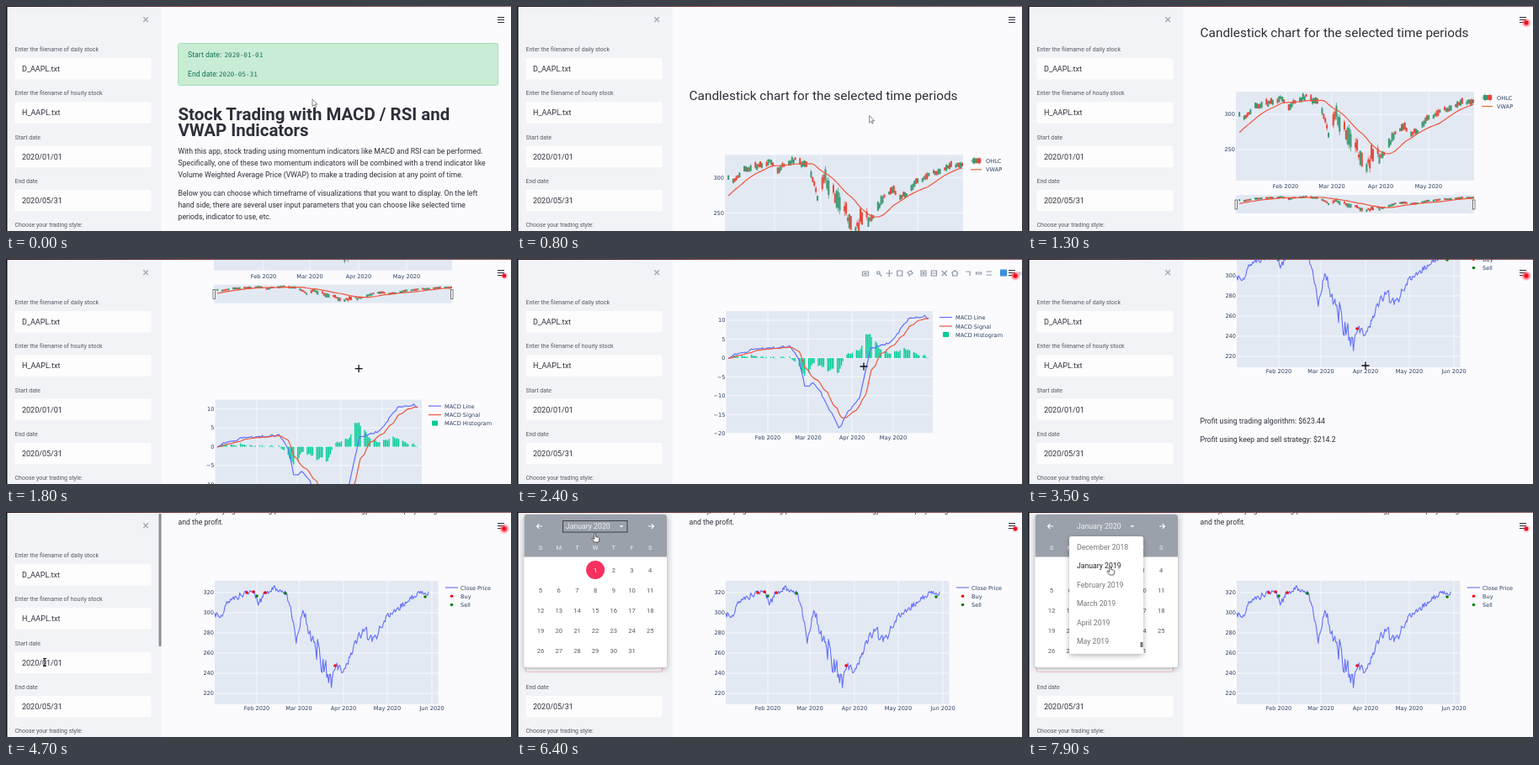
These frames come from a looping animation (600 by 268 pixels, 8000 ms). An HTML page:

```html
<!DOCTYPE html>
<html lang="en">
<head>
<meta charset="utf-8">
<title>Stock trading dashboard</title>
<style>
html, body { margin: 0; height: 100%; overflow: hidden; background: #fbfbfe; }
svg { display: block; width: 100vw; height: 100vh; }
text { font-family: Roboto, sans-serif; white-space: pre; }
.plot { font-family: "DejaVu Sans", sans-serif; }
.mono { font-family: "DejaVu Sans Mono", monospace; }
</style>
</head>
<body>
<svg id="stage" viewBox="0 0 600 268"></svg>
<script>
const INK = '#2d2f39', TICK = '#2a3f5f', PLOT = '#e2e9f3';
const BLUE = '#636efa', RED = '#ef553b', GREEN = '#00cc96';

// ---------- drawing helpers ----------
const text = (x, y, s, size = 8.7, fill = INK, more = '') =>
  `<text x="${x}" y="${y}" font-size="${size}" fill="${fill}" ${more}>${s}</text>`;
const label = (x, y, s, anchor = 'start') =>
  text(x, y, s, 6.6, TICK, `class="plot" text-anchor="${anchor}"`);
const rect = (x, y, w, h, fill, more = '') =>
  `<rect x="${x}" y="${y}" width="${w}" height="${h}" fill="${fill}" ${more}/>`;
const dot = (x, y, r, fill) => `<circle cx="${x}" cy="${y}" r="${r}" fill="${fill}"/>`;
const path = (d, stroke, width = 1, more = '') =>
  `<path d="${d}" fill="none" stroke="${stroke}" stroke-width="${width}" ${more}/>`;
const line = (pts, stroke, width = 1.2) =>
  path('M' + pts.map(p => p.map(v => v.toFixed(1)).join(' ')).join('L'), stroke, width, 'stroke-linejoin="round"');
const group = (id, body) => `<g id="${id}">${body}</g>`;
const span = (a, b, step = 1) => Array.from({ length: Math.floor((b - a) / step) + 1 }, (_, i) => a + i * step);
const points = s => s.split(' ').map(p => p.split(',').map(Number));

let seed = 11;
const rnd = () => (seed = (seed * 16807) % 2147483647) / 2147483647;
const bump = (x, center, width) => Math.exp(-(((x - center) / width) ** 2));
const smooth = k => k * k * (3 - 2 * k);

// Value of column c at x, between rows sorted by their first column.
function lerp(rows, x, ease = k => k, c = 1) {
  const i = rows.findIndex(r => r[0] >= x);
  if (i < 0) return rows[rows.length - 1][c];
  if (i === 0) return rows[0][c];
  const a = rows[i - 1], b = rows[i];
  return a[c] + (b[c] - a[c]) * ease((x - a[0]) / (b[0] - a[0]));
}

// ---------- market data ----------
const closeKeys = points('205,195 248,122 256,124 264,106 286,96 294,93 300,110 307,97 320,90 333,97 338,112 345,155 352,118 364,150 387,206 391,184 402,190 413,160 426,137 432,154 440,148 452,126 474,109 488,98 503,97');
const macdKeys = points('249,118 262,113 280,108 325,104 335,118 342,152 352,148 362,161 383,202 393,182 407,166 420,107 445,99 466,70 485,68 494,75');

const weekdays = span(2, 149).filter(d => (d + 3) % 7 % 6);
const priceAt = day => 320 - (lerp(closeKeys, 298 + (day - 31) * 1.72) - 96) / 1.2;
const average = list => list.reduce((a, b) => a + b) / list.length;
const vwapAt = day => average(span(day - 20, day).map(priceAt));

// Chart background, horizontal lines [value, y] and one vertical line per month.
function frame(x, y, w, h, rows, monthXs, labelY) {
  return rect(x, y, w, h, PLOT) +
    rows.map(([v, ry]) => path(`M${x} ${ry}h${w}`, '#fff', .7) + label(x - 1, ry + 2.4, v, 'end')).join('') +
    monthXs.map((cx, i) => path(`M${cx} ${y}v${h}`, '#fff', .7) +
      label(cx, labelY, ['Feb', 'Mar', 'Apr', 'May', 'Jun'][i] + ' 2020', 'middle')).join('');
}
const legend = (y, mark, name, x) => mark + label(x, y + 2.5, name);

// ---------- page sections ----------
function intro() {
  const lines = [
    'With this app, stock trading using momentum indicators like MACD and RSI can be performed.',
    'Specifically, one of these two momentum indicators will be combined with a trend indicator like',
    'Volume Weighted Average Price (VWAP) to make a trading decision at any point of time.',
    'Below you can choose which timeframe of visualizations that you want to display. On the left',
    'hand side, there are several user input parameters that you can choose like selected time',
    'periods, indicator to use, etc.'];
  const green = '#14735a', mono = 'class="mono"', bold = 'font-weight="700"';
  return rect(204.5, 44.5, 380, 50, '#c9ecd5', 'stroke="#a3e0ba" rx="2"') +
    text(216, 61, 'Start date:', 8.7, green) + text(259.5, 61, '2020-01-01', 7.6, green, mono) +
    text(216, 84, 'End date:', 8.7, green) + text(253, 84, '2020-05-31', 7.6, green, mono) +
    text(204.5, 135.7, 'Stock Trading with MACD / RSI and', 20.45, INK, bold) +
    text(204.5, 154.5, 'VWAP Indicators', 20.45, INK, bold) +
    lines.map((s, i) => text(204.5, 176.3 + i * 13.9 + (i > 2 ? 8.3 : 0), s)).join('');
}

function candles() {
  const toX = d => 306 + (d - 31) * 1.89, toY = p => 129 + (300 - p) * .84;
  const mini = y => 226 + (y - 102) * .19;
  let bars = '', small = '';
  for (const d of weekdays) {
    const x = toX(d), wild = 6 + 18 * bump(d, 75, 18);
    const mid = toY(priceAt(d)) + (rnd() - .4) * wild * .6;
    const h = 3 + rnd() * wild * .75, wick = h + rnd() * wild * .5;
    const color = rnd() < .52 ? '#3d9970' : '#e8483c';
    bars += rect(x - 1, mid - h / 2, 2, h, color) + path(`M${x} ${mid - wick / 2}v${wick}`, color, .7);
    small += rect(x - 1, mini(mid) - 1, 2, 1.3 + h * .19, color);
  }
  const trend = weekdays.map(d => [toX(d), toY(vwapAt(d))]);
  return text(204.5, 37, 'Candlestick chart for the selected time periods', 15.4) +
    frame(247, 102, 283, 106, [[300, 129], [250, 171]], [306, 361, 419, 476], 217) +
    bars + line(trend, RED) +
    rect(247, 225, 283, 22, PLOT) + small + line(trend.map(([x, y]) => [x, mini(y)]), RED) +
    [246, 528.5].map(x => rect(x, 231, 2.5, 11, '#fff', 'stroke="#444" stroke-width=".7"')).join('') +
    legend(109.5, path('M539 109h13M543 104.5v9M549 104.5v9', '#555', .6) +
      rect(541, 106, 5, 6, '#3d9970') + rect(546, 106, 5, 6, '#e8483c'), 'OHLC', 557) +
    legend(119.5, path('M539 119.5h13', '#f0652e', 1.2), 'VWAP', 557);
}

function macdChart() {
  let average = 118;
  const macd = [], signal = [];
  let bars = '';
  for (const d of weekdays) {
    const x = 298 + (d - 31) * 1.62, y = lerp(macdKeys, x) + (rnd() - .5) * 3;
    average += (y - average) * .2;
    macd.push([x, y]);
    signal.push([x, average]);
    const gap = (y - average) * .95;
    bars += rect(x - .65, 118 + Math.min(0, gap), 1.3, Math.max(.5, Math.abs(gap)), GREEN);
  }
  const rows = span(0, 6).map(i => [(i > 2 ? '−' : '') + Math.abs(10 - i * 5), 73 + i * 22.45]);
  return frame(248.5, 62, 245.5, 146, rows, [298, 346, 398, 447], 215) +
    bars + line(macd, BLUE) + line(signal, RED) +
    legend(69.5, path('M502 69.5h15', BLUE, 1.2), 'MACD Line', 521) +
    legend(80, path('M502 80h15', RED, 1.2), 'MACD Signal', 521) +
    legend(90.2, rect(506, 87, 7, 6, GREEN), 'MACD Histogram', 521);
}

function closeChart() {
  const hourly = span(248, 503, 1.1).map(x => {
    const amp = 7 + 22 * bump(x, 373, 18) + 6 * bump(x, 430, 25);
    return [x, lerp(closeKeys, x) + (rnd() - .5) * amp];
  });
  const rows = span(0, 5).map(i => [320 - i * 20, 96 + i * 24]);
  const marks = (s, color) => points(s).map(([x, y]) => dot(x, y, 1.8, color)).join('');
  return text(204.5, 1.2, 'Finally, the buying and selling points of the chosen strategy can be displayed together with the') +
    text(204.5, 15, 'and the profit.') +
    frame(248, 82, 265.5, 147, rows, [298, 348, 401, 453, 506], 235.5) +
    line(hourly, BLUE, 1.1) +
    marks('286,96 294,95 308,96 391,183', '#f00') + marks('298,100 332,97 498,101', '#008000') +
    legend(90, path('M522 90h15', BLUE, 1.1), 'Close Price', 540) +
    legend(100.3, dot(529.5, 100.3, 1.8, '#f00'), 'Buy', 540) +
    legend(110.5, dot(529.5, 110.5, 1.8, '#008000'), 'Sell', 540) +
    text(204.5, 295.5, 'Profit using trading algorithm: $623.44') +
    text(204.5, 318, 'Profit using keep and sell strategy: $214.2');
}

// ---------- fixed parts ----------
function modebar() {
  const box = 'M-3-3h6v6h-6z';
  const groups = [
    ['M-3.5-2h7v5h-7zM-1 0h2v1h-2z'],
    ['M-2-2h3v3h-3zM1 1l2.5 2.5', 'M0-4v8M-4 0h8', box, 'M-3-1l4-2 2 3-4 2zM-1 2v2'],
    [box + 'M-2 0h4M0-2v4', box + 'M-2 0h4', 'M-3-3l6 6M3-3l-6 6', 'M-4 0l4-3.5 4 3.5M-2.5 0v3h5v-3'],
    ['M-3-2h5v5', 'M-3-1h6v2h-6z', 'M-3-2h6M-3 2h6']];
  let i = 0;
  return groups.map((icons, g) => icons.map(d =>
    path(d, '#8d96a5', 1.2, `transform="translate(${414 + 12.4 * i++ + 3.5 * g} 17)"`)).join('')).join('') +
    rect(574, 12.5, 8, 8, '#3d8fe0') + path('M595.5 15l4 4M599.5 15l-4 4', '#8d96a5', .8);
}

function sidebar() {
  const fields = {
    'Enter the filename of daily stock': 'D_AAPL.txt', 'Enter the filename of hourly stock': 'H_AAPL.txt',
    'Start date': '2020/01/01', 'End date': '2020/05/31', 'Choose your trading style:': ''
  };
  return rect(0, 0, 184.5, 268, '#f1f3f6') +
    path('M163.3 13.3l5.6 5.6M168.9 13.3l-5.6 5.6', '#a3a8b4', 1.4) +
    Object.entries(fields).map(([name, value], i) => {
      const y = i * 52.3;
      return text(10.5, 54 + y, name, 7, '#555964') +
        rect(10.5, 62 + y, 162, 25.5, '#fdfdfe', 'rx="2"') + text(19, 78 + y, value, 9);
    }).join('');
}

function calendar() {
  const col = i => 28 + i * 21.7, mid = 'text-anchor="middle"';
  const days = span(1, 31).map(d => {
    const cell = d + 2, x = col(cell % 7), y = 69 + Math.floor(cell / 7) * 24;
    return (d === 1 ? dot(x, y, 11, '#f7315f') : '') + text(x, y + 2.8, d, 7.6, d === 1 ? '#fff' : '#555a63', mid);
  }).join('');
  return rect(10.5, 166.6, 162, 24, '#fdfdfe', 'rx="2" stroke="#f3b6c6"') +
    rect(8.5, 3, 169.5, 182, '#fff', 'rx="3" filter="url(#shadow)"') +
    `<path d="M8.5 53.5V6q0-3 3-3H175q3 0 3 3V53.5z" fill="#9ba1aa"/>` +
    path('M30 17h-6.5m2.8-2.8l-2.8 2.8 2.8 2.8M156 17h6.5m-2.8-2.8l2.8 2.8-2.8 2.8', '#fff', 1.1) +
    text(58, 20.2, 'January 2020', 8.7, '#f1f2f4') +
    `<path d="M121.5 16h5l-2.5 2.6z" fill="#f1f2f4"/>` +
    group('focus', rect(54.5, 10.5, 76.5, 13.5, 'none', 'stroke="#3b3f46"')) +
    [...'SMTWTFS'].map((s, i) => text(col(i), 45, s, 7.6, '#eef0f2', mid)).join('') + days;
}

const monthNames = 'January February March April May June July August September October November December'.split(' ');
const options = ['December 2018', ...monthNames.map(m => m + ' 2019'), 'January 2020'];
const menu = () => rect(49, 29, 88, 140, '#fff', 'rx="3" filter="url(#shadow)"') +
  `<g clip-path="url(#menuClip)">${group('options', options.map((s, i) => text(58, 44.7 + i * 22.5, s)).join(''))}</g>` +
  group('thumb', rect(133.5, 155, 3, 6, '#70747c'));

const cursors = {
  none: '',
  arrow: '<path d="M0 0v8.5l2-1.8 1.4 3 1.3-.6-1.4-2.9h2.7z" fill="#fff" stroke="#555" stroke-width=".7"/>',
  cross: path('M-4.5 0h9M0-4.5v9', '#111', 1.3),
  beam: path('M-2-4.5h4M0-4.5v9M-2 4.5h4', '#111', 1),
  hand: '<path d="M-1.3-4q0-1.2 1-1.2t1 1.2v2.6q3.8.2 4 1.6v2.6L3.6 5H-.8L-4 1.2q-.3-1.4.9-1l1.8 1.2z" fill="#fff" stroke="#333" stroke-width=".8"/>'
};

const stage = document.getElementById('stage');
stage.innerHTML = `<defs>
  <filter id="shadow" x="-20%" y="-20%" width="140%" height="140%"><feDropShadow dx="0" dy="2" stdDeviation="3" flood-opacity=".3"/></filter>
  <filter id="soft" x="-50%" y="-50%" width="200%" height="200%"><feGaussianBlur stdDeviation="1.2"/></filter>
  <clipPath id="menuClip"><rect x="49" y="30" width="88" height="138"/></clipPath>
  <linearGradient id="strip"><stop stop-color="#2a1418"/><stop offset=".4" stop-color="#7a3d45"/><stop offset="1" stop-color="#8a5a60"/></linearGradient>
</defs>` + rect(0, 0, 600, 268, '#fbfbfe') +
  group('page', [[0, intro()], [380, candles()], [680, macdChart()], [1000, closeChart()]]
    .map(([y, s]) => `<g transform="translate(0 ${y})">${s}</g>`).join('')) +
  group('modebar', modebar()) +
  path('M584 13.5h8M584 16.5h8M584 19.5h8', INK, 1.2) +
  group('record', `<circle id="glow" cx="592" cy="20" fill="#ff5a6a" filter="url(#soft)"/>` + dot(592, 20, 2.4, '#f0101c')) +
  sidebar() + group('scrollbar', rect(181.5, 2, 3, 158, '#8b8e95')) +
  group('calendar', calendar()) + group('menu', menu()) +
  rect(0, 0, 1.5, 268, '#15131a') + rect(0, 0, 600, 1, 'url(#strip)') +
  group('cursor', '');

// ---------- motion ----------
const el = id => document.getElementById(id);
const show = (id, on) => el(id).setAttribute('display', on ? 'inline' : 'none');
const shift = (id, x, y) => el(id).setAttribute('transform', `translate(${x.toFixed(2)} ${y.toFixed(2)})`);

// Rows of time and position.
const scroll = points('300,0 1000,380 1500,380 2000,680 2700,680 3300,1100 3900,1100 4300,1000');
const mouse = points('300,364,111 900,423,132 1600,423,132 2100,412,128 2700,412,128 3300,401,127 4000,401,127 4600,46,179 5000,46,179 6100,93,42 6700,93,20 7300,98,70');
const menuScroll = points('7000,8 7600,0');
const cursorFrom = { 0: 'arrow', 1000: 'none', 1600: 'cross', 4000: 'arrow', 4400: 'beam', 5100: 'hand' };

function draw(now) {
  const t = Math.floor(now % 8000 / 100) * 100;
  shift('page', 0, -lerp(scroll, t, smooth));

  const y = lerp(mouse, t, smooth, 2);
  shift('cursor', lerp(mouse, t, smooth), y);
  const since = Object.keys(cursorFrom).filter(k => k <= t).pop();
  el('cursor').innerHTML = cursors[cursorFrom[since]];

  show('modebar', t >= 2000 && t < 2800);
  show('record', t >= 900);
  const pulse = .5 + .5 * Math.cos((t + 100) / 1200 * 2 * Math.PI);
  el('glow').setAttribute('r', 2.5 + 2 * pulse);

  show('scrollbar', t >= 4400 && t < 5000);
  show('calendar', t >= 5000);
  show('focus', t >= 6100 && t < 6700);
  show('menu', t >= 6700);

  const top = lerp(menuScroll, t, smooth);
  shift('options', 0, -top * 22.5);
  shift('thumb', 0, top * .8);
  const hovered = Math.floor((y - 30) / 22.5 + top);
  [...el('options').children].forEach((o, i) => o.setAttribute('fill', i === hovered ? '#22252b' : '#777'));
}

const start = performance.now();
(function tick() {
  draw(performance.now() - start);
  requestAnimationFrame(tick);
})();
</script>
</body>
</html>
```
